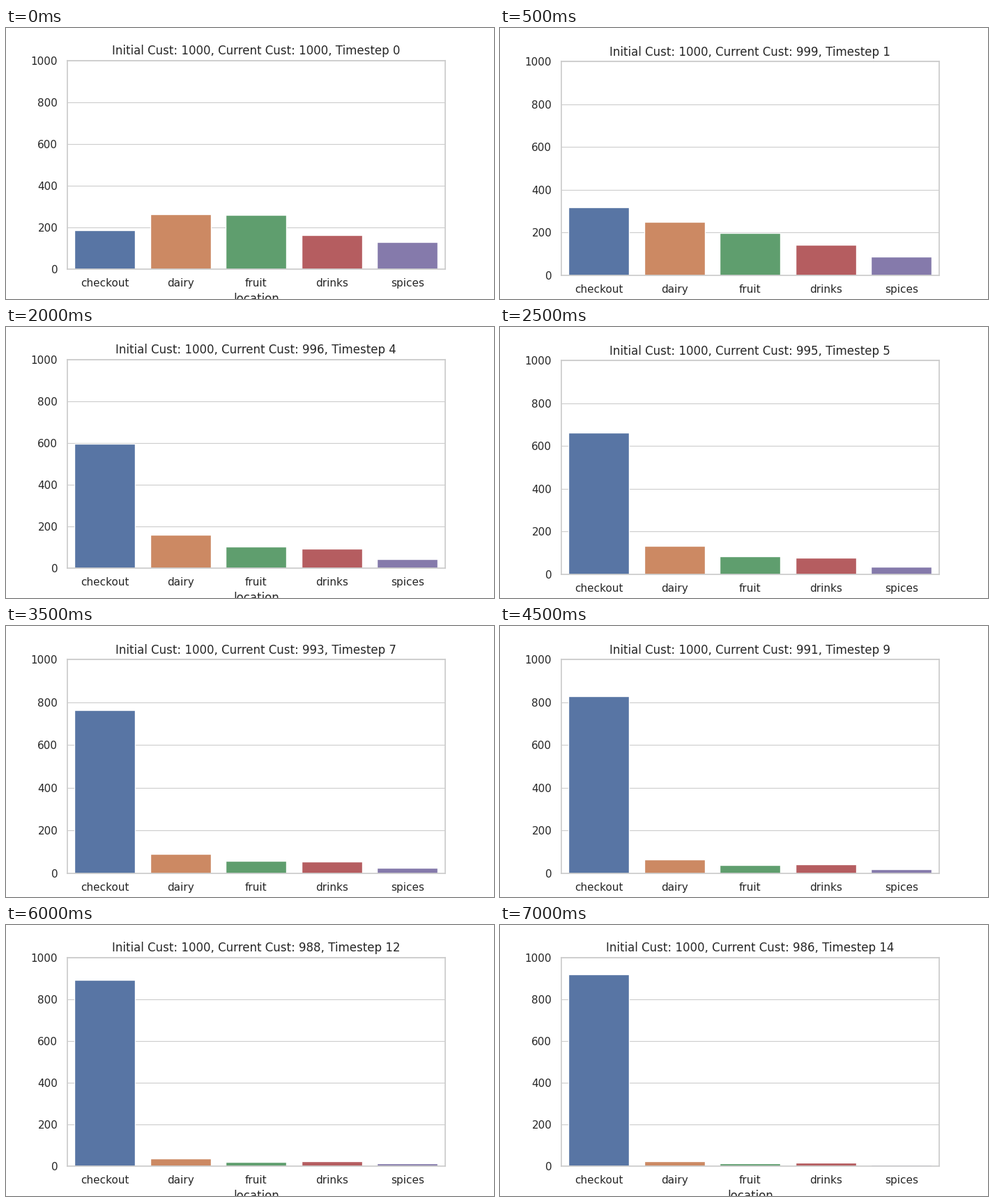
A matplotlib script that plays this animation: 700 by 390 pixels, repeating every 7500 ms.

```python
import numpy as np
import matplotlib.pyplot as plt
from matplotlib.animation import FuncAnimation

WIDTH, HEIGHT, DPI = 700, 390, 100
STEPS, INTERVAL = 15, 500
TOTAL = 1000
LOCATIONS = ["checkout", "dairy", "fruit", "drinks", "spices"]
COLORS = ["#5875a4", "#cc8963", "#5f9e6e", "#b55d60", "#857aab"]

# Shoppers per aisle: initial crowd, crowd once mixed, share staying per step
START = np.array([263, 259, 163, 129])
MIXED = np.array([340, 228, 176, 82])
STAY = np.array([0.83, 0.82, 0.85, 0.85])
MIXING = 0.4

TEXT, LINE = "0.15", "0.8"
plt.rcParams.update({
    "font.family": "DejaVu Sans",
    "axes.titlesize": 12, "axes.labelsize": 12,
    "xtick.labelsize": 11, "ytick.labelsize": 11,
    "xtick.major.size": 6, "ytick.major.size": 6,
    "xtick.bottom": False, "ytick.left": False,
    "text.color": TEXT, "axes.labelcolor": TEXT,
    "xtick.color": TEXT, "ytick.color": TEXT,
    "axes.edgecolor": LINE, "axes.linewidth": 1.25, "axes.axisbelow": True,
    "grid.color": LINE, "grid.linewidth": 0.8, "grid.linestyle": "-",
})


def counts_at(step):
    """Aisles mix quickly, then empty steadily into the checkout."""
    aisles = MIXED * STAY**step + (START - MIXED) * MIXING**step
    aisles = np.round(aisles)
    return [TOTAL - step - aisles.sum(), *aisles]


fig, ax = plt.subplots(figsize=(WIDTH / DPI, HEIGHT / DPI), dpi=DPI,
                       facecolor="white")
bars = ax.bar(LOCATIONS, counts_at(0), width=0.8, color=COLORS,
              edgecolor="white", linewidth=1)
ax.set(xlim=(-0.5, 4.5), ylim=(0, TOTAL), xlabel="location")
ax.set_yticks(range(0, TOTAL + 1, 200))
ax.yaxis.grid(True)


def place_axes(page_height):
    """Lay out the axes on a page aligned to the top of the stage."""
    bottom = HEIGHT - 0.89 * page_height
    ax.set_position([0.125, bottom / HEIGHT, 0.775,
                     0.77 * page_height / HEIGHT])


def update(step):
    # Odd steps use a taller page whose lower edge is cut off
    place_axes(400 if step % 2 else HEIGHT)
    for bar, count in zip(bars, counts_at(step)):
        bar.set_height(count)
    ax.set_title(f"Initial Cust: {TOTAL}, Current Cust: {TOTAL - step}, "
                 f"Timestep {step}")
    return [*bars, ax.title]


anim = FuncAnimation(fig, update, frames=STEPS, interval=INTERVAL,
                     repeat=True, repeat_delay=0, blit=False)
plt.show()
```
